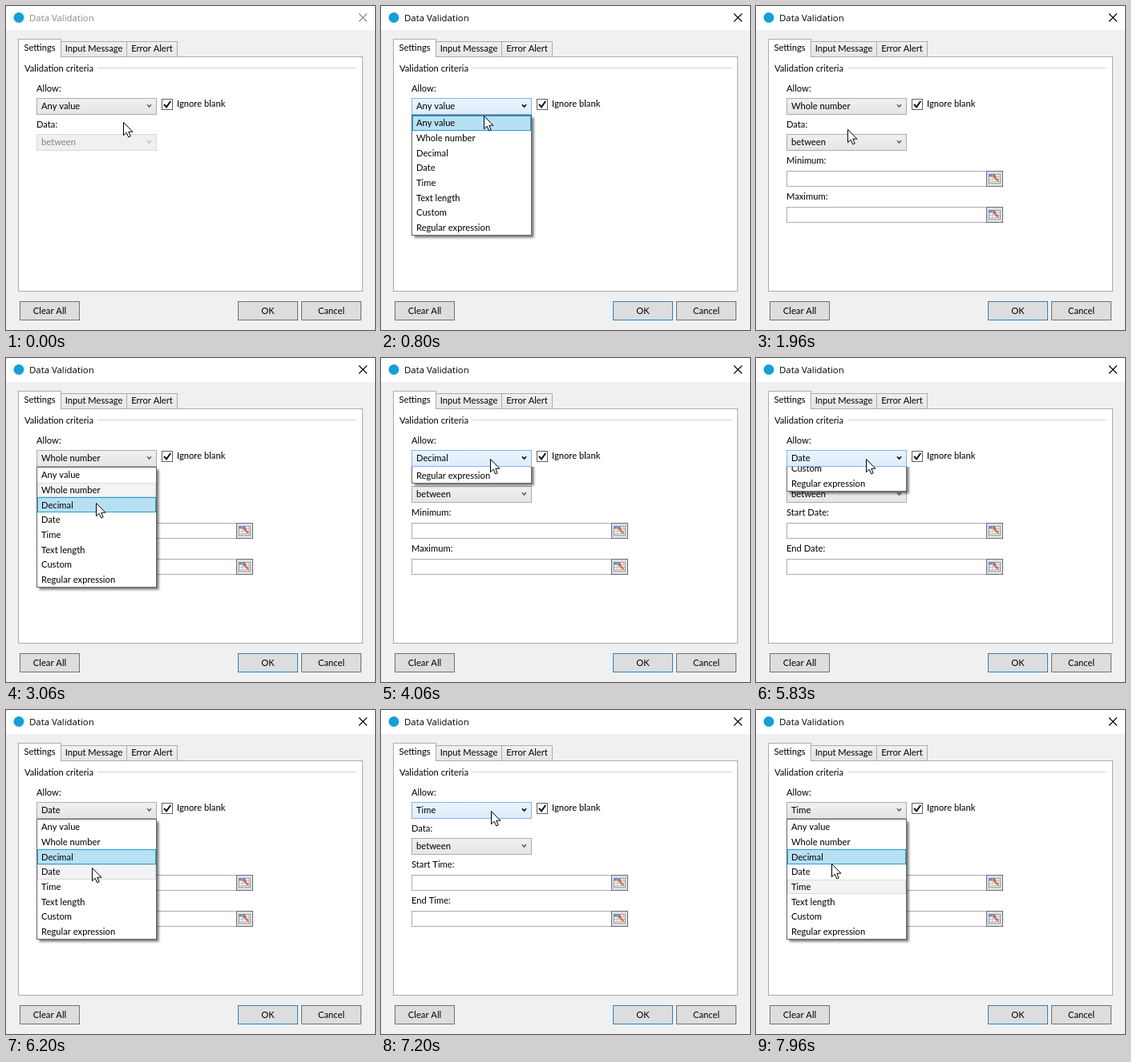
These frames come from a looping animation (460 by 405 pixels, 8 s). An HTML page with a canvas:

```html
<!DOCTYPE html>
<html lang="en">
<head>
<meta charset="utf-8">
<title>Data Validation</title>
<style>
html, body { margin: 0; width: 100%; height: 100%; overflow: hidden; background: #f0f0f0; }
canvas { display: block; width: 460px; height: 405px; }
</style>
</head>
<body>
<canvas id="stage"></canvas>
<script>
const W = 460, H = 405, LOOP = 8000;
const canvas = document.getElementById('stage');
const ctx = canvas.getContext('2d');
const ratio = window.devicePixelRatio || 1;
canvas.width = W * ratio;
canvas.height = H * ratio;

const BODY = '11.2px Lato, sans-serif';
const TITLE = '11.4px "Open Sans", sans-serif';
const ITEMS = ['Any value', 'Whole number', 'Decimal', 'Date', 'Time',
  'Text length', 'Custom', 'Regular expression'];
const FIELDS = [null, ['Minimum:', 'Maximum:'], ['Minimum:', 'Maximum:'],
  ['Start Date:', 'End Date:'], ['Start Time:', 'End Time:']];
const LIST = { x: 38, y: 136, w: 150, h: 151, row: 18.65 };
const SLIDE = 150, HOVER_LAG = 40, APPLY_LAG = 40;

// Pointer moves: start, end, target x, target y
const START = [146, 145];
const MOVES = [
  [30, 330, 138, 126], [690, 1230, 112, 156.2],
  [1945, 2300, 136, 126], [2640, 3030, 112, 181],
  [3380, 3730, 136, 126], [4300, 4630, 91, 198],
  [5180, 5600, 137, 126], [5960, 6400, 99, 215.5],
  [6840, 7230, 137, 126], [7680, 8150, 86, 205]
];
// Drop-down sessions: opened, closed, chosen item
const OPENS = [[400, 1530, 1], [2440, 3300, 2], [4040, 5100, 3],
  [5800, 6760, 4], [7510, 9000, 4]];

function pointer(t) {
  let [x, y] = START;
  for (const [from, to, tx, ty] of MOVES) {
    if (t <= from) break;
    const u = Math.min(1, (t - from) / (to - from));
    const e = u * (2 - u);
    x += (tx - x) * e;
    y += (ty - y) * e;
  }
  return { x, y };
}

function box(x, y, w, h, fill, edge) {
  ctx.fillStyle = edge;
  ctx.fillRect(x, y, w, h);
  ctx.fillStyle = fill;
  ctx.fillRect(x + 1, y + 1, w - 2, h - 2);
}

function text(s, x, y, color = '#000', align = 'left', font = BODY) {
  ctx.font = font;
  ctx.fillStyle = color;
  ctx.textAlign = align;
  ctx.fillText(s, x, y);
}

function poly(points, close) {
  ctx.beginPath();
  points.forEach(([x, y]) => ctx.lineTo(x, y));
  if (close) ctx.closePath();
}

function stroke(points, color, width) {
  poly(points);
  ctx.strokeStyle = color;
  ctx.lineWidth = width;
  ctx.stroke();
}

function shade(y, h, top, bottom) {
  const g = ctx.createLinearGradient(0, y, 0, y + h);
  g.addColorStop(0, top);
  g.addColorStop(1, bottom);
  return g;
}

function inside(p, x, y, w, h) {
  return p.x >= x && p.x < x + w && p.y >= y && p.y < y + h;
}

function combo(y, label, state) {
  const looks = {
    normal: [shade(y, 21, '#f0f0f0', '#e5e5e5'), '#acacac', '#000', '#606060'],
    hover: [shade(y, 21, '#ecf4fc', '#dcecfc'), '#7eb4ea', '#000', '#000'],
    disabled: ['#f0f0f0', '#d9d9d9', '#838383', '#bfbfbf']
  };
  const [fill, edge, ink, arrow] = looks[state];
  box(38, y, 150, 21, fill, edge);
  text(label, 44, y + 14, ink);
  stroke([[176, y + 8.2], [178.5, y + 11], [181, y + 8.2]], arrow, 1.5);
}

function button(x, label, edge = '#707070') {
  box(x, 369, 75, 24, '#dddddd', edge);
  text(label, x + 37.5, 385, '#000', 'center');
}

function tab(x, y, w, label, active) {
  const h = 64 - y;
  box(x, y, w, h, active ? '#fff' : shade(y, h, '#f0f0f0', '#e5e5e5'), '#acacac');
  text(label, x + w / 2, active ? 56 : 57, '#000', 'center');
}

function rangeField(y, label) {
  text(label, 38, y - 9);
  box(38, y, 250, 20, '#fff', '#abadb3');
  box(287, y, 21, 20, '#dddddd', '#707070');
  box(290, y + 4, 15, 12, '#fff', '#9a9fa8');
  ctx.fillStyle = '#5b8fd0';
  ctx.fillRect(290, y + 4, 8, 3);
  ctx.fillStyle = '#b9bec8';
  for (const r of [7, 10, 13]) ctx.fillRect(291, y + r, 13, 1);
  for (const c of [294, 298, 302]) ctx.fillRect(c, y + 5, 1, 10);
  stroke([[297, y + 7], [302, y + 13]], '#d8633c', 2);
  poly([[295.5, y + 5.5], [300, y + 6], [296, y + 10]], true);
  ctx.fillStyle = '#d8633c';
  ctx.fill();
}

function dialog(active) {
  ctx.fillStyle = '#f0f0f0';
  ctx.fillRect(0, 0, W, H);
  ctx.fillStyle = '#fff';
  ctx.fillRect(0, 0, W, 30);
  ctx.beginPath();
  ctx.arc(16, 14.5, 6.5, 0, Math.PI * 2);
  ctx.fillStyle = '#139fda';
  ctx.fill();
  const ink = active ? '#000' : '#8c8c8c';
  text('Data Validation', 29, 19, ink, 'left', TITLE);
  stroke([[440, 9.5], [450, 19.5]], ink, 1.1);
  stroke([[450, 9.5], [440, 19.5]], ink, 1.1);

  tab(68, 44, 83, 'Input Message');
  tab(150, 44, 64, 'Error Alert');
  box(15, 63, 430, 294, '#fff', '#acacac');
  tab(15, 41, 54, 'Settings', true);
  ctx.fillStyle = '#fff';
  ctx.fillRect(16, 62, 52, 3);

  text('Validation criteria', 23, 82);
  ctx.fillStyle = '#d5d5d5';
  ctx.fillRect(114, 77, 323, 1);
  text('Allow:', 38, 107);
  text('Data:', 38, 152);
  box(194, 116, 14, 14, '#fff', '#606060');
  stroke([[197, 122.8], [200, 126.3], [205.2, 119]], '#111', 2);
  text('Ignore blank', 213, 126);

  button(17, 'Clear All');
  button(289, 'OK', active ? '#2a84c4' : '#707070');
  button(368, 'Cancel');
}

function row(i, fill, edge) {
  const top = Math.round(LIST.y + 1 + i * LIST.row);
  const bottom = Math.round(LIST.y + 1 + (i + 1) * LIST.row);
  box(LIST.x + 1, top, LIST.w - 2, bottom - top, fill, edge);
}

function dropDown(progress, selected, lit) {
  const { x, y, w, h } = LIST;
  ctx.save();
  ctx.beginPath();
  ctx.rect(0, y, W, H - y);
  ctx.clip();
  ctx.translate(0, -Math.round(h * (1 - progress)));
  ctx.save();
  ctx.shadowColor = 'rgba(0,0,0,.55)';
  ctx.shadowBlur = 3 * ratio;
  ctx.shadowOffsetX = ctx.shadowOffsetY = 2.5 * ratio;
  ctx.fillStyle = '#fff';
  ctx.fillRect(x, y, w, h);
  ctx.restore();
  box(x, y, w, h, '#fff', '#646464');
  row(selected, '#f3f3f5', '#dadadc');
  row(lit, '#b8e0f3', '#26a0da');
  ITEMS.forEach((s, i) => text(s, 44, Math.round(y + 14.3 + i * LIST.row)));
  ctx.restore();
}

function arrow({ x, y }) {
  ctx.save();
  ctx.translate(Math.round(x) + 0.5, Math.round(y) + 0.5);
  poly([[0, 0], [0, 16.2], [3.7, 12.7], [6.2, 18.4], [8.7, 17.3],
    [6.3, 11.7], [11.4, 11.7]], true);
  ctx.fillStyle = '#fff';
  ctx.fill();
  ctx.strokeStyle = '#000';
  ctx.lineWidth = 1;
  ctx.stroke();
  ctx.restore();
}

function draw(t) {
  ctx.setTransform(ratio, 0, 0, ratio, 0, 0);
  const aim = pointer(t - HOVER_LAG);
  const open = OPENS.find(([from, to]) => t >= from && t < to);
  let chosen = 0;
  for (const [, closed, item] of OPENS) {
    if (t >= closed + APPLY_LAG) chosen = item;
  }

  dialog(t >= 30);
  const over = t >= 30 && inside(aim, 38, 115, 150, 21);
  combo(115, ITEMS[chosen], over ? 'hover' : 'normal');
  const overData = !open && inside(aim, 38, 160, 150, 21);
  combo(160, 'between', !chosen ? 'disabled' : overData ? 'hover' : 'normal');
  if (chosen) {
    rangeField(206, FIELDS[chosen][0]);
    rangeField(251, FIELDS[chosen][1]);
  }

  if (open) {
    const overList = inside(aim, LIST.x, LIST.y + 1, LIST.w, LIST.h - 2);
    const lit = overList
      ? Math.min(ITEMS.length - 1, Math.floor((aim.y - LIST.y - 1) / LIST.row))
      : chosen;
    dropDown(Math.min(1, (t - open[0]) / SLIDE), chosen, lit);
  }
  arrow(pointer(t));
}

const began = performance.now();
function tick() {
  draw((performance.now() - began) % LOOP);
  requestAnimationFrame(tick);
}
tick();
</script>
</body>
</html>
```
